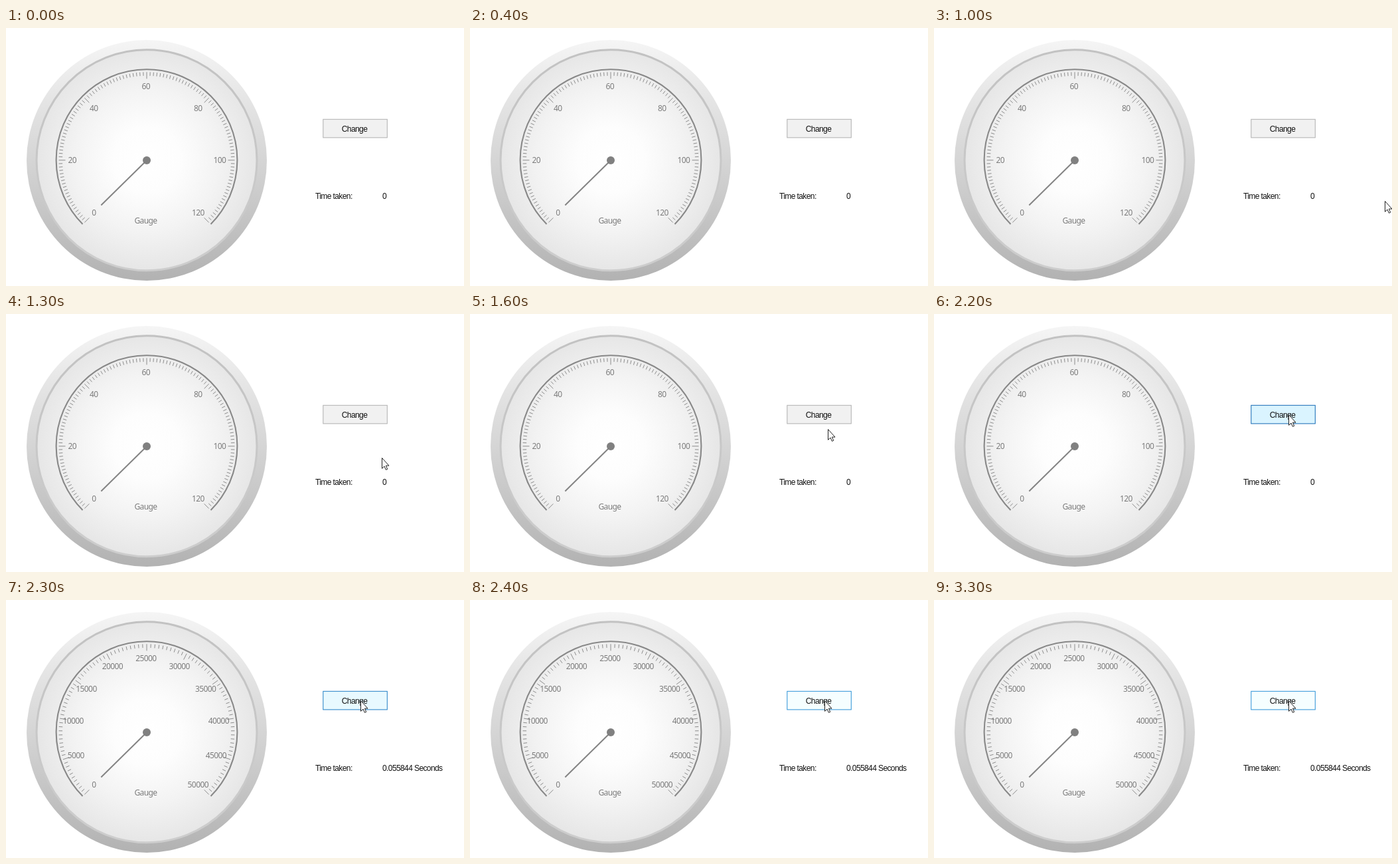
An HTML page for the animation above (5600 ms loop, 690x388 px).

```html
<!DOCTYPE html>
<html lang="en">
<head>
<meta charset="utf-8">
<title>Gauge</title>
<style>
html, body { margin: 0; width: 100%; height: 100%; overflow: hidden; background: #fff; }
svg { display: block; width: 690px; height: 388px; }
.dial { font: 12px "Noto Sans", "Open Sans", sans-serif; letter-spacing: -.6px; fill: #7c7c7c; text-anchor: middle; }
.form { font: 12px "Liberation Sans", Arial, sans-serif; letter-spacing: -.6px; fill: #111; }
</style>
</head>
<body>
<svg viewBox="0 0 690 388">
  <defs>
    <linearGradient id="rim" x1="0" y1="0" x2="0" y2="1">
      <stop offset="0" stop-color="#f5f5f5"/>
      <stop offset=".5" stop-color="#d5d5d5"/>
      <stop offset="1" stop-color="#b2b2b2"/>
    </linearGradient>
    <linearGradient id="edge" x1="0" y1="0" x2="0" y2="1">
      <stop offset="0" stop-color="#c2c2c2"/>
      <stop offset="1" stop-color="#cdcdcd"/>
    </linearGradient>
    <radialGradient id="face">
      <stop offset="0" stop-color="#fff"/>
      <stop offset=".3" stop-color="#fdfdfd"/>
      <stop offset=".65" stop-color="#f3f3f3"/>
      <stop offset="1" stop-color="#e6e6e6"/>
    </radialGradient>
  </defs>
  <circle cx="212" cy="199" r="181" fill="url(#rim)"/>
  <circle cx="212" cy="198.7" r="166" fill="url(#face)" stroke="url(#edge)" stroke-width="3"/>
  <path d="M115.5 295A136.4 136.4 0 1 1 308.5 295" fill="none" stroke="#888" stroke-width="2.1"/>
  <g id="scales"></g>
  <text class="dial" x="210.5" y="294">Gauge</text>
  <path d="M212 199L143.3 266.5" stroke="#838383" stroke-width="2"/>
  <circle cx="212" cy="199" r="6" fill="#808080"/>
  <rect id="button" x="477.8" y="137.3" width="96.5" height="27.6"/>
  <g class="form">
    <text x="525" y="155.5" text-anchor="middle">Change</text>
    <text x="466" y="257.3">Time taken:</text>
    <text id="time" x="567" y="257.3"></text>
  </g>
  <path id="cursor" d="M.5 .5V16.3L4 13 6.4 18.3 8.7 17.3 6.4 12.1H11Z" fill="#fff" stroke="#222"/>
</svg>
<script>
const $ = id => document.getElementById(id);

// Markup for a 270 degree scale
function scale(max, major, minor) {
  let ticks = "", labels = "";
  for (let v = 0; v <= max; v += minor) {
    const a = (135 + 270 * v / max) * Math.PI / 180;
    const at = r => (212 + r * Math.cos(a)).toFixed(2) + " " + (198.8 + r * Math.sin(a)).toFixed(2);
    const big = v % major === 0;
    ticks += `M${at(132.5)}L${at(big ? 122.5 : 127)}`;
    if (big) {
      const x = 210.8 + 111 * Math.cos(a), y = 203.3 + 111 * Math.sin(a);
      labels += `<text x="${x}" y="${y}">${v}</text>`;
    }
  }
  return `<g class="dial"><path d="${ticks}" stroke="#8c8c8c"/>${labels}</g>`;
}
$("scales").innerHTML = scale(120, 20, 1) + scale(50000, 5000, 500);
const [before, after] = $("scales").children;

// Cursor positions, one per 100 ms from 1000 ms
const path = [[679, 260], [637, 254], [594, 232], [566, 216], [551, 204],
  [540, 179], [539, 173], [537, 162], [535, 155], [534, 151]];

const looks = {
  idle: ["#f1f1f1", "#b0b0b0"],
  hover: ["#f5feff", "#2b91d6"],
  press: ["#daf4ff", "#1268b3"],
  release: ["#e8f9ff", "#1f7dc5"]
};

function draw(t) {
  const done = t >= 2300;
  before.style.display = done ? "none" : "";
  after.style.display = done ? "" : "none";
  $("time").textContent = done ? "0.055844 Seconds" : "0";

  const look = t < 1700 ? "idle" : t < 2200 ? "hover" : t < 2300 ? "press" : t < 2400 ? "release" : "hover";
  const [fill, stroke] = looks[look];
  $("button").setAttribute("fill", fill);
  $("button").setAttribute("stroke", stroke);

  const step = Math.min(Math.floor((t - 1000) / 100), path.length - 1);
  $("cursor").style.display = step < 0 ? "none" : "";
  if (step >= 0) $("cursor").setAttribute("transform", `translate(${path[step]})`);
}

const start = performance.now();
function frame() {
  draw((performance.now() - start) % 5600);
  requestAnimationFrame(frame);
}
frame();
</script>
</body>
</html>
```
